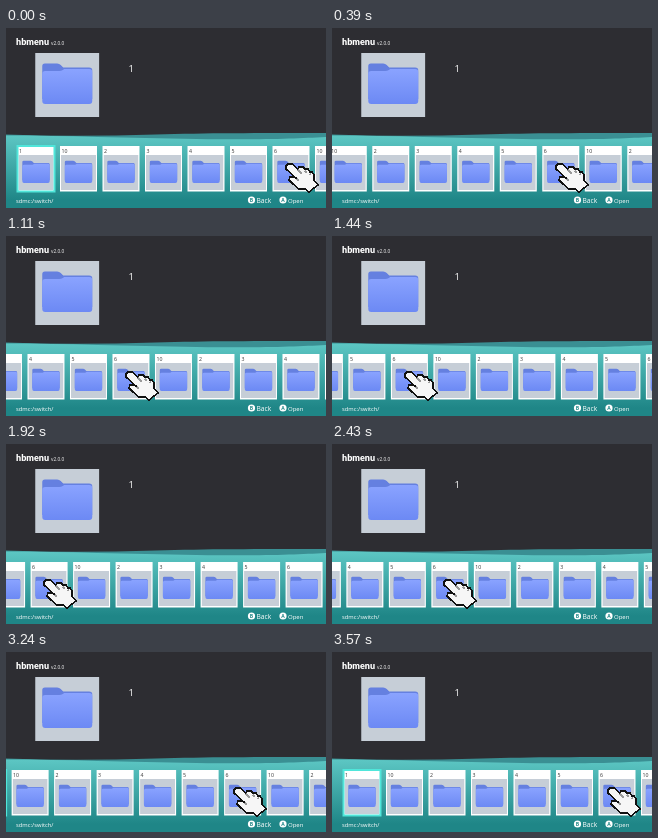
An HTML page that plays this animation: 320x180 px, repeating every 3.6 s.

```html
<!DOCTYPE html>
<html lang="en">
<head>
<meta charset="utf-8">
<title>hbmenu</title>
<style>
  html, body { margin: 0; width: 100%; height: 100%; overflow: hidden; background: #2d2d32; }
  svg { display: block; width: 100vw; height: 100vh; }
  text { font-family: "Open Sans", "Noto Sans", sans-serif; fill: #fff; }
  .title { font: 900 9px Lato, sans-serif; }
  .label { font-size: 5.2px; fill: #333; }
  .key { font-size: 5px; font-weight: 700; fill: #1f8687; text-anchor: middle; }
</style>
</head>
<body>
<svg viewBox="0 0 320 180">
  <defs>
    <linearGradient id="front" x1="0" y1="108" x2="0" y2="172" gradientUnits="userSpaceOnUse">
      <stop stop-color="#5cc6c3"/><stop offset="1" stop-color="#1f8687"/>
    </linearGradient>
    <linearGradient id="flap" x2="0" y2="1">
      <stop stop-color="#8aa3ff"/><stop offset="1" stop-color="#6c89f4"/>
    </linearGradient>
    <symbol id="icon" viewBox="0 0 64 64">
      <path fill="#c6ced7" d="M0 0H64V64H0Z"/>
      <path fill="#6580e0" d="M7 13Q7 10.500 9.500 10.500H22Q24 10.500 25.500 12L28 14.500H54Q57 14.500 57 17V46H7Z"/>
      <path fill="url(#flap)" d="M7 21Q7 18 10 18H24Q26 18 27.500 17L29 16H54Q57 16 57 19V48Q57 51 54 51H10Q7 51 7 48Z"/>
    </symbol>
  </defs>

  <path fill="#2d2d32" d="M0 0H320V180H0Z"/>
  <path fill="#3a8f93" d="M0 106.500C50 108.500 100 108 150 106.500S250 105 320 105V180H0Z"/>
  <path fill="url(#front)" d="M0 107.500C60 107.500 120 110 190 111S290 110.500 320 109V180H0Z"/>

  <text class="title" x="10" y="17">hbmenu</text>
  <text x="45" y="17" font-size="4.800">v2.0.0</text>
  <use href="#icon" x="29" y="25" width="64.500" height="64"/>
  <text x="122.500" y="44" font-size="9.500">1</text>

  <g id="cards"></g>

  <text x="10" y="174.500" font-size="5.800">sdmc:/switch/</text>
  <circle cx="245.500" cy="172" r="3.600" fill="#fff"/>
  <text class="key" x="245.500" y="173.800">B</text>
  <text x="250.500" y="174.500" font-size="6.700">Back</text>
  <circle cx="277" cy="172" r="3.600" fill="#fff"/>
  <text class="key" x="277" y="173.800">A</text>
  <text x="282" y="174.500" font-size="6">Open</text>

  <g id="hand" shape-rendering="crispEdges" stroke="#111" stroke-width="1.600">
    <path fill="#f6f6f6" d="M1 3L3 1H7L13 6L14 4H18L20 6H23L25 9H27L29 12V17L33 22L24 29L20 26H14L8 21L4 17L5 14H9L12 16L1 6Z"/>
    <path fill="none" stroke="#999" d="M13 7L17 11M20 8L22 10M25 11L26 12M12 16L14 18"/>
  </g>
</svg>
<script>
  const FRAME = 30, FRAMES = 120, TURN = 60, TRAVEL = 259.5;
  const PITCH = 42.5, FIRST_X = 11.5;
  const HAND_START = 279, HAND_TURN = 20, HAND_END = 275;
  const names = [1, 10, 2, 3, 4, 5, 6, 10, 2, 3, 4, 5, 6, 10];
  const cards = document.getElementById("cards");
  const hand = document.getElementById("hand");

  const card = (name, i) => `<g transform="translate(${FIRST_X + i * PITCH} 118)">
    <path fill="#fff" d="M0 0H37V45.500H0Z"/>
    <use href="#icon" x="1" y="9" width="35" height="35"/>
    <text class="label" x="1.500" y="6.500">${name}</text>
    ${i ? "" : '<path fill="none" stroke="#50e6da" stroke-width="2" d="M0 0H37V45.500H0Z"/>'}</g>`;
  cards.innerHTML = names.map(card).join("");

  function draw() {
    const step = Math.floor(performance.now() / FRAME) % FRAMES;
    const forward = step < TURN;
    const away = forward ? step / TURN : (FRAMES - 1 - step) / (FRAMES - 1 - TURN);
    const rest = forward ? HAND_START : HAND_END;
    cards.setAttribute("transform", `translate(${-TRAVEL * away} 0)`);
    hand.setAttribute("transform", `translate(${Math.round(rest + (HAND_TURN - rest) * away)} 135)`);
    requestAnimationFrame(draw);
  }
  draw();
</script>
</body>
</html>
```
